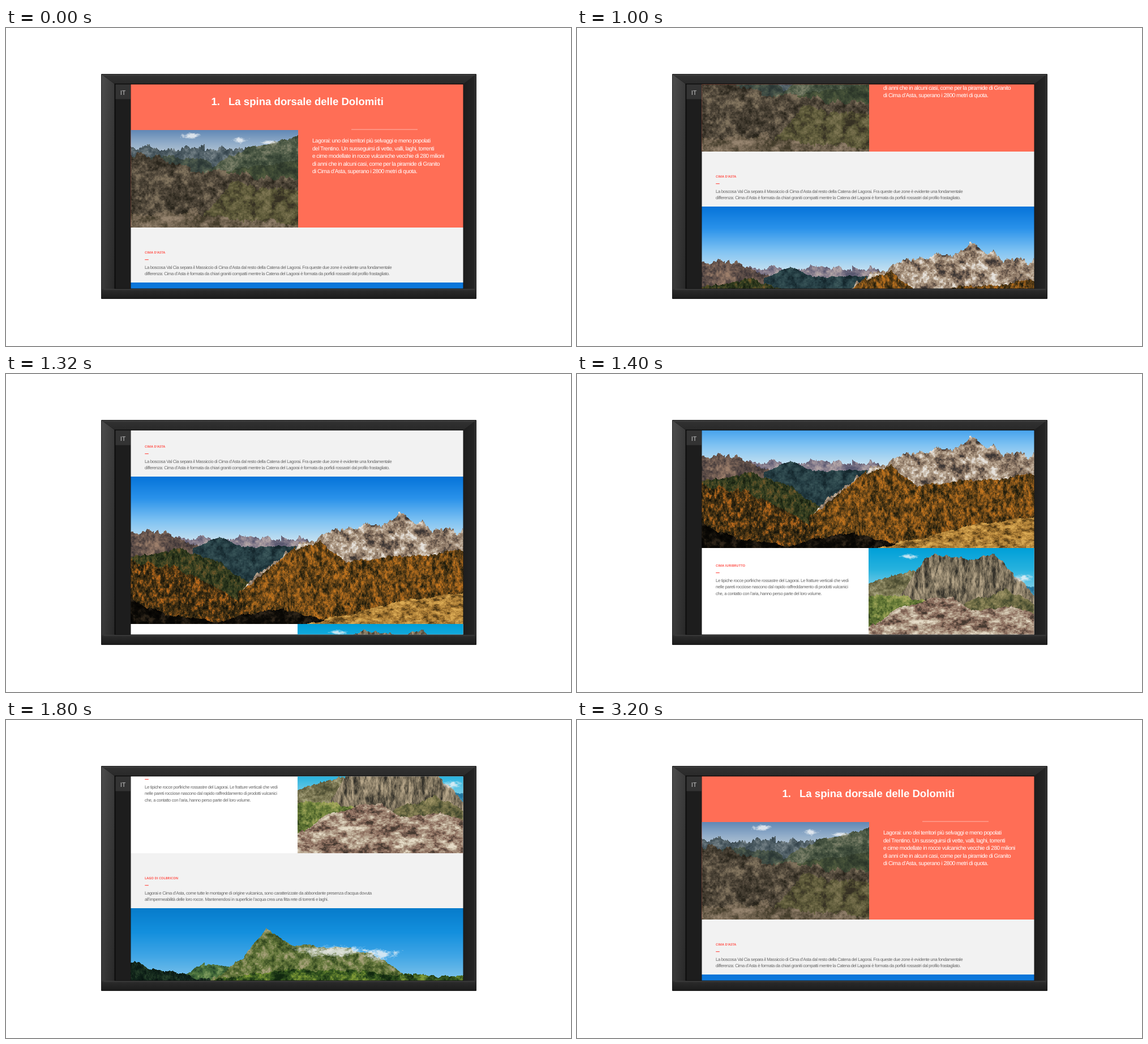
Animation of 998 by 561 pixels, one loop 4 s. Source, as an HTML page with a canvas:

```html
<!DOCTYPE html>
<html lang="it">
<head>
<meta charset="utf-8">
<title>Lagorai</title>
<style>
  html, body { margin: 0; width: 100%; height: 100%; overflow: hidden; background: #fff; }
  svg, canvas { display: block; position: absolute; }
  svg { left: 0; top: 0; }
  #screen { position: absolute; left: 220px; top: 99px; width: 588px; height: 361px; overflow: hidden; clip-path: inset(.5px); }
  #page { position: absolute; left: -220px; top: -99px; width: 998px; height: 1110px; }
  text { text-rendering: geometricPrecision; font-family: "Liberation Sans", Arial, sans-serif; }
  .title { font-size: 18.6px; font-weight: 700; fill: #fff; }
  .intro { font-size: 10.05px; letter-spacing: -.05em; fill: #fff; }
  .copy { font-size: 7.9px; letter-spacing: -.05em; fill: #666; }
  .label { font: 700 5.8px "Open Sans", sans-serif; fill: #ff5c55; }
  .lang { font: 600 11px "Open Sans", sans-serif; fill: #a9a9a9; }
</style>
</head>
<body>
<svg width="998" height="561">
  <defs>
    <linearGradient id="leftBar" x2="1" y2="1"><stop stop-color="#4c4c4c"/><stop offset=".5" stop-color="#3a3a3a"/><stop offset="1" stop-color="#282828"/></linearGradient>
    <linearGradient id="rightBar"><stop stop-color="#1d1d1d"/><stop offset=".85" stop-color="#252525"/><stop offset="1" stop-color="#383838"/></linearGradient>
    <linearGradient id="topBar" x2="0" y2="1"><stop stop-color="#414141"/><stop offset=".2" stop-color="#303030"/><stop offset="1" stop-color="#292929"/></linearGradient>
    <linearGradient id="bottomBar" x2="0" y2="1"><stop stop-color="#343434"/><stop offset=".2" stop-color="#292929"/><stop offset="1" stop-color="#1c1c1c"/></linearGradient>
  </defs>
  <rect x="168" y="81" width="663" height="397" rx="1" fill="#1c1c1c"/>
  <path d="M169 82L192 99V461H169Z" fill="url(#leftBar)"/>
  <path d="M830 82L808 99V461H830Z" fill="url(#rightBar)"/>
  <path d="M169 82H830L808 98.5H192Z" fill="url(#topBar)"/>
  <rect x="169" y="460.5" width="661" height="16.5" fill="url(#bottomBar)"/>
  <path d="M173 461H827" stroke="#444" stroke-width=".8"/>
  <rect x="191.5" y="98" width="616.5" height="362" fill="#0c0c0c"/>
  <rect x="193.5" y="99.5" width="26.5" height="360" fill="#1d1d1d"/>
  <rect x="193.5" y="99.5" width="26.5" height="26" fill="#333"/>
  <text class="lang" x="201.7" y="117.6">IT</text>
</svg>
<div id="screen">
  <div id="page">
    <svg id="copy" width="998" height="1110">
      <rect x="220" y="99" width="588" height="253" fill="#ff6e56"/>
      <text class="title" x="362.5" y="136">1.</text>
      <text class="title" x="393" y="136">La spina dorsale delle Dolomiti</text>
      <path d="M610 179H727" stroke="#fff" stroke-width=".9" opacity=".55"/>
    </svg>
  </div>
</div>

<script>
const page = document.getElementById('page');
const copy = document.getElementById('copy');
const clamp = v => Math.max(0, Math.min(1, v));

// ---- Text ----
function lines(className, x, y, leading, rows) {
  copy.insertAdjacentHTML('beforeend', rows.map((row, i) =>
    `<text class="${className}" x="${x}" y="${y + i * leading}">${row}</text>`).join(''));
}

function block(top, height, background, labelY, label, rows) {
  const y = top + labelY;
  copy.insertAdjacentHTML('beforeend', `
    <rect x="220" y="${top}" width="588" height="${height}" fill="${background}"/>
    <text class="label" x="245" y="${y}">${label}</text>
    <path d="M245.3 ${y + 10.6}h6.5" stroke="#ff5c55" stroke-width="1.1"/>`);
  lines('copy', 245, y + 26.6, 11.8, rows);
}

// ---- Noise ----
function hash(x, y) {
  const s = Math.sin(x * 127.1 + y * 311.7) * 43758.5453;
  return s - Math.floor(s);
}

function noise(x, y) {
  const ix = Math.floor(x), iy = Math.floor(y);
  const ease = f => f * f * (3 - 2 * f);
  const u = ease(x - ix), v = ease(y - iy);
  const row = j => hash(ix, j) * (1 - u) + hash(ix + 1, j) * u;
  return row(iy) * (1 - v) + row(iy + 1) * v;
}

// Four octaves, centred on zero
function fractal(x, y) {
  let sum = 0, weight = 1;
  for (let octave = 0; octave < 4; octave++) {
    sum += (noise(x, y) - .5) * weight;
    x *= 2.1; y *= 2.1; weight *= .75;
  }
  return sum;
}

// ---- Landscapes ----
const palette = text => text.split(' ').map(c => c.match(/\w\w/g).map(v => parseInt(v, 16)));
const mix = (a, b, f) => a.map((v, i) => v + (b[i] - v) * f);

function ramp(colours, t) {
  const at = clamp(t) * (colours.length - 1);
  const i = Math.min(Math.floor(at), colours.length - 2);
  return mix(colours[i], colours[i + 1], at - i);
}

// A slope lies below its crest: straight lines between key points, roughened by noise.
function slope(crest, tones, { rough = 10, grain = [12, 12] } = {}) {
  const points = crest.split(' ').map(p => p.split(',').map(Number));
  const top = x => {
    const i = points.findIndex((p, k) => k && x >= points[k - 1][0] && x <= p[0]);
    if (i < 0) return Infinity;
    const [x0, y0] = points[i - 1], [x1, y1] = points[i];
    return y0 + (y1 - y0) * (x - x0) / (x1 - x0) + fractal(x / 16, y0 + y1) * rough;
  };
  return { top, grain, tones: palette(tones) };
}

function photo(left, top, width, height, sky, horizon, slopes, clouds) {
  const canvas = document.createElement('canvas');
  Object.assign(canvas, { width, height });
  canvas.style.cssText = `left:${left}px;top:${top}px`;
  page.append(canvas);
  const ctx = canvas.getContext('2d');
  const image = ctx.createImageData(width, height);
  const skyTones = palette(sky), white = [243, 245, 247];
  for (let x = 0; x < width; x++) {
    const tops = slopes.map(s => s.top(x));
    for (let y = 0; y < height; y++) {
      const front = slopes[tops.findLastIndex(t => y >= t)];
      let colour = front
        ? ramp(front.tones, .5 + .75 * fractal(x / front.grain[0], y / front.grain[1]))
        : ramp(skyTones, y / horizon);
      for (const [cx, cy, rx, ry] of clouds) {
        const density = 1 - Math.hypot((x - cx) / rx, (y - cy) / ry);
        if (density > -.5) colour = mix(colour, white, clamp(density * 1.3 + fractal(x / 12, y / 7)) * .8);
      }
      image.data.set([...colour, 255], (y * width + x) * 4);
    }
  }
  ctx.putImageData(image, 0, 0);
}

lines('intro', 541, 202.3, 13.5, [
  'Lagorai: uno dei territori più selvaggi e meno popolati',
  'del Trentino. Un susseguirsi di vette, valli, laghi, torrenti',
  'e cime modellate in rocce vulcaniche vecchie di 280 milioni',
  'di anni che in alcuni casi, come per la piramide di Granito',
  'di Cima d’Asta, superano i 2800 metri di quota.'
]);
block(352, 97, '#f2f2f2', 46, "CIMA D'ASTA", [
  'La boscosa Val Cia separa il Massiccio di Cima d’Asta dal resto della Catena del Lagorai. Fra queste due zone è evidente una fondamentale',
  'differenza: Cima d’Asta è formata da chiari graniti compatti mentre la Catena del Lagorai è formata da porfidi rossastri dal profilo frastagliato.'
]);
block(709, 174, '#fff', 33, 'CIMA IURIBRUTTO', [
  'Le tipiche rocce porfiriche rossastre del Lagorai. Le fratture verticali che vedi',
  'nelle pareti rocciose nascono dal rapido raffreddamento di prodotti vulcanici',
  'che, a contatto con l’aria, hanno perso parte del loro volume.'
]);
block(883, 97, '#f2f2f2', 46, 'LAGO DI COLBRICON', [
  'Lagorai e Cima d’Asta, come tutte le montagne di origine vulcanica, sono caratterizzate da abbondante presenza d’acqua dovuta',
  'all’impermeabilità delle loro rocce. Mantenendosi in superficie l’acqua crea una fitta rete di torrenti e laghi.'
]);

const trees = { rough: 6, grain: [5, 8] };

// Green valley
photo(220, 180, 296, 172, '#6288b5 #8fabc8 #bccad6', 44, [
  slope('0,28 60,34 130,31 220,38', '#35444c #505f66 #7a868b'),
  slope('0,46 110,48 180,72', '#2b3735 #3e4b43 #586452'),
  slope('130,76 175,44 220,28 296,9', '#303d30 #4b5844 #7c8069', { rough: 5 }),
  slope('60,72 160,74 296,50', '#2a3428 #3b4733 #555f40', { rough: 5 }),
  slope('0,46 50,44 105,72 168,74 215,84 296,86', '#28241b #50473a #82745e'),
  slope('110,172 180,94 296,108', '#353023 #5a5737 #7d7552'),
  slope('0,150 100,143 200,158 296,166', '#433c2b #716350 #96846f')
], [[106, 10, 15, 5], [195, 17, 18, 5], [245, 21, 16, 3]]);

// Autumn panorama
photo(220, 449, 588, 260, '#0674d9 #2a92ea #7cc1f2 #c8e2f1', 115, [
  slope('0,108 152,109 265,107 340,114', '#595870 #847b8b #b3a5a6'),
  slope('0,104 40,98 115,119 200,140', '#3a3335 #6b584f #9d7f6b'),
  slope('110,126 155,107 200,124 320,122', '#14262c #263f45 #3b575a', { rough: 4 }),
  slope('0,141 88,126 150,148 225,198', '#161f10 #354021 #70582a', trees),
  slope('190,202 280,130 360,91 450,82 472,66 505,84 588,96', '#3c3634 #806b5a #b5a18b #e6e2dc'),
  slope('190,202 290,128 335,112 380,150 480,140 588,131', '#1d1b0c #6b4718 #c4761f', trees),
  slope('0,150 80,160 150,195 215,238', '#12120a #4a3514 #c26d1c', trees),
  slope('0,216 60,242 150,256 200,243 270,232 330,250 380,260', '#040302 #0c0a06 #30261a', { rough: 4 }),
  slope('310,260 400,240 470,220 588,204', '#4d3714 #aa7b34 #dcac55', { rough: 4, grain: [10, 6] })
], []);

// Porphyry wall
photo(515, 709, 293, 174, '#009fd8 #27b2de #86d2e8', 75, [
  slope('245,66 293,68', '#22749c #3a8fb4 #6cb2cc', { rough: 5 }),
  slope('0,64 40,46 110,38', '#494a30 #77734f #a8a37e', { rough: 6 }),
  slope('55,82 100,18 117,12 185,19 222,10 255,45 293,84', '#2f2d27 #7a6f5a #b9a88b', { rough: 6, grain: [6, 20] }),
  slope('0,82 60,85 150,98', '#33481d #6b7f3a #a5a85c', { rough: 5 }),
  slope('150,106 240,72 293,98', '#3c432a #706d45 #a29768', { rough: 6 }),
  slope('0,140 50,106 120,86 150,88 190,110 250,103 293,116', '#453930 #8e6f5f #b9a892 #e6dcc8', { rough: 5, grain: [16, 10] })
], [[70, 15, 14, 4], [272, 54, 18, 7]]);

// Lake panorama
photo(220, 980, 588, 128, '#077ccb #138fdd #3fa5e5 #7cc2ea', 125, [
  slope('80,122 130,98 175,100 210,125', '#24452a #48703c #7c9a5c', { rough: 4 }),
  slope('140,128 200,84 238,36 285,66 380,70 425,78 480,115', '#30451d #66793c #a9a27c', { rough: 5 }),
  slope('110,128 200,117 280,107 588,121', '#10270f #34551f #7f9a36', { rough: 6 }),
  slope('0,93 60,112 140,128', '#071410 #11251a #27402a', trees)
], [[355, 76, 62, 10], [442, 80, 30, 10]]);

// ---- Scrolling: hard steps every 200 ms between 1 s and 2 s, then back to the top ----
const offsets = [134, 268, 402, 525, 648];
function tick() {
  const time = performance.now() % 4000;
  const offset = offsets[Math.floor((time - 1000) / 200)] || 0;
  page.style.transform = `translateY(${-offset}px)`;
  requestAnimationFrame(tick);
}
tick();
</script>
</body>
</html>
```
